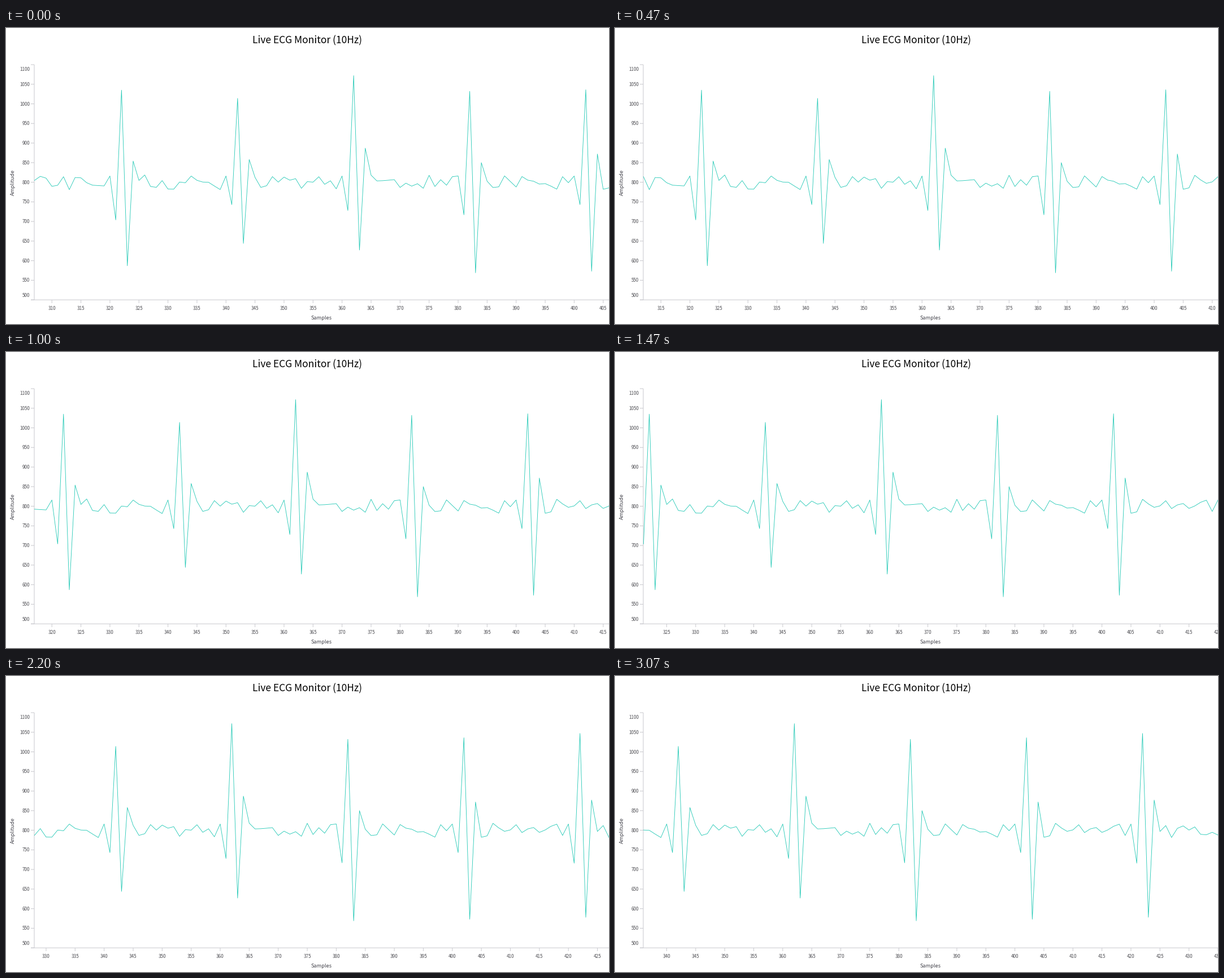
Animation of 1067x525 px, one loop 3.14 s. Source, as a matplotlib script:

```python
import matplotlib.pyplot as plt
import numpy as np
from matplotlib.animation import FuncAnimation

W, H, DPI = 1067, 525, 100
LOOP, STEP = 3140, 10
LEFT, TOP, BOTTOM = 50.4, 65, 482.2
FIRST, LAST, SPAN = 307, 435, 99
DX = (W - LEFT) / SPAN
DY = (BOTTOM - TOP) / 600

TEAL, AXIS, GREY, DARK = "#24c9b6", "#c9c9ce", "#505055", "#44444c"
plt.rcParams["font.family"] = "Noto Sans CJK JP"

# Dip, peak, trough and rebound of each heartbeat; one beat per 20 samples.
BEAT_START, BEAT_EVERY = 320, 20
BEATS = [
    (704, 1035, 587, 854),
    (743, 1014, 644, 858),
    (728, 1072, 627, 887),
    (717, 1032, 569, 850),
    (743, 1036, 573, 872),
    (716, 1047, 578, 877),
]


def make_ecg():
    """Resting noise around 800 with a sharp beat at regular intervals."""
    rng = np.random.default_rng(7)
    ecg = rng.uniform(781, 819, LAST - FIRST + 1)
    for k, beat in enumerate(BEATS):
        at = BEAT_START + BEAT_EVERY * k - FIRST
        ecg[at:at + 5] = 816, *beat
    return ecg


def samples_arrived(ms):
    """A sample comes every 1.61 refreshes of a 15 Hz screen."""
    refresh = np.floor(1.31 + 1.61 * np.arange(LAST - FIRST - SPAN))
    shown_at = np.round(refresh * 100 / 15) * 10
    return int(np.sum(shown_at <= ms))


def to_y(value):
    return BOTTOM - (value - 500) * DY


fig = plt.figure(figsize=(W / DPI, H / DPI), dpi=DPI, facecolor="white")
ax = fig.add_axes([0, 0, 1, 1])
ax.set_xlim(0, W)
ax.set_ylim(H, 0)
ax.axis("off")


def label(x, y, text, px, color, ha="center", va="baseline", **kw):
    return ax.text(x, y, text, fontsize=px * 72 / DPI, color=color,
                   ha=ha, va=va, **kw)


def rule(xs, ys):
    return ax.plot(xs, ys, color=AXIS, lw=0.72, solid_capstyle="butt",
                   snap=False)[0]


label(532.5, 27, "Live ECG Monitor (10Hz)", 17.4, "black")
label(558.5, 517, "Samples", 9.25, DARK)
label(12, 273.5, "Amplitude", 9.4, DARK, rotation=90, va="center")

rule([50, 50], [TOP, BOTTOM])
rule([44, W], [BOTTOM, BOTTOM])
for value in range(500, 1101, 50):
    y = to_y(value)
    rule([44, 50], [y, y])
    # The end labels are pushed inside the axis.
    shift = {500: -8, 1100: 8}.get(value, 0)
    label(42, y + 3 + shift, str(value), 8.1, GREY, ha="right")

ecg = make_ecg()
trace_x = LEFT + DX * np.arange(SPAN + 1)
trace, = ax.plot([], [], color=TEAL, lw=0.62, solid_joinstyle="round")
marks = [rule([], []) for _ in range(SPAN // 5 + 1)]
names = [label(0, 500, "", 8.1, GREY) for _ in marks]


def draw(i):
    shown = samples_arrived(i * STEP)
    start = FIRST + shown
    trace.set_data(trace_x, to_y(ecg[shown:shown + SPAN + 1]))
    major = -(-start // 5) * 5
    for k, (mark, name) in enumerate(zip(marks, names)):
        sample = major + 5 * k
        x = LEFT + DX * (sample - start)
        mark.set_data([x, x], [BOTTOM, 488])
        name.set_x(x)
        name.set_text(str(sample))
    return [trace, *marks, *names]


anim = FuncAnimation(fig, draw, frames=LOOP // STEP, interval=STEP,
                     repeat=True, repeat_delay=0)
plt.show()
```
